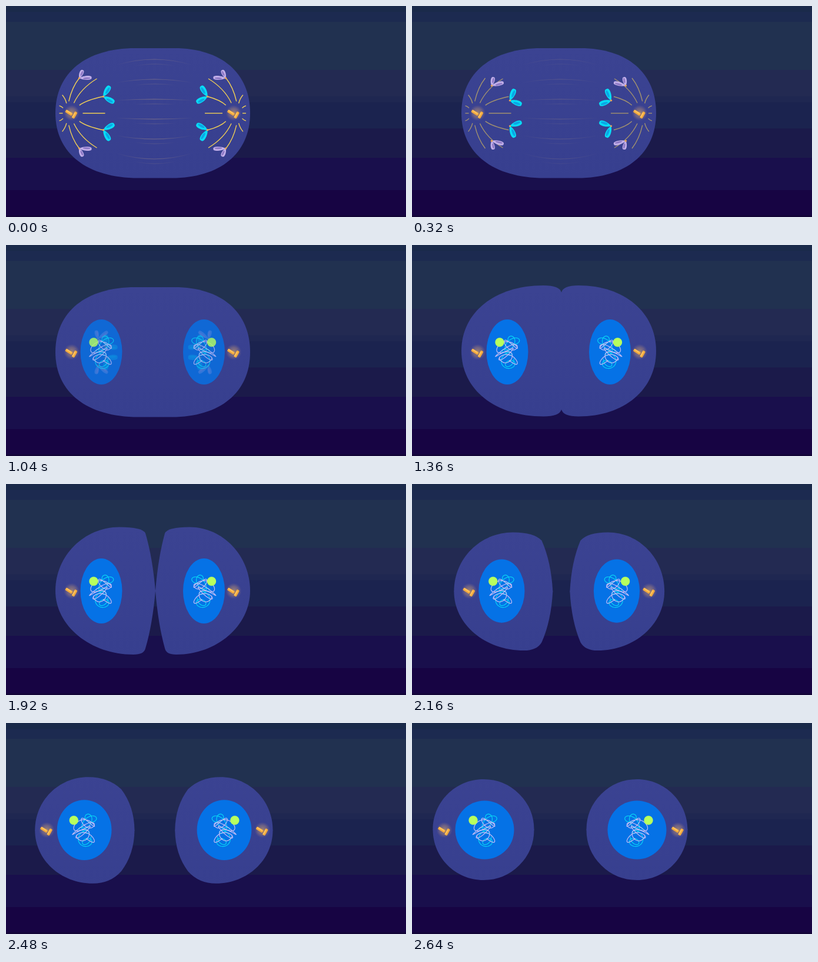
Write an HTML page with a canvas that moves like this. It is 680 by 360 pixels and loops after 2.88 s.

```html
<!DOCTYPE html>
<html lang="en">
<head>
<meta charset="utf-8">
<title>Cell division</title>
<style>
  html, body { margin: 0; width: 100%; height: 100%; overflow: hidden; background: #170443; }
  canvas { display: block; }
</style>
</head>
<body>
<canvas id="stage" width="680" height="360"></canvas>
<script>
const ctx = document.getElementById('stage').getContext('2d');
const LOOP = 2880, TICK = 80, MID_Y = 183;

const mix = (a, b, p) => Array.isArray(a) ? a.map((v, i) => mix(v, b[i], p)) : a + (b - a) * p;
const ramp = (t, from, to) => Math.min(1, Math.max(0, (t - from) / (to - from)));

function disc(x, y, rx, ry, fill) {
  ctx.fillStyle = fill;
  ctx.beginPath();
  ctx.ellipse(x, y, rx, ry, 0, 0, 7);
  ctx.fill();
}

function strokeCurve(...[x0, y0, cx, cy, x1, y1]) {
  ctx.beginPath();
  ctx.moveTo(x0, y0);
  ctx.quadraticCurveTo(cx, cy, x1, y1);
  ctx.stroke();
}

// dir points from the outer edge of each half towards the middle
const sides = [
  { dir: 1, pole: [111.5, 55], nucleus: [162, 123.5] },
  { dir: -1, pole: [387, 452], nucleus: [336.5, 382.5] }
];

// ---- background ----
const bands = [[0, '#1a2a4a'], [10, '#1c2a50'], [27, '#213150'], [109, '#232a52'], [154, '#1f2751'],
  [164, '#1b234f'], [209, '#1b1a4a'], [259, '#190f4c'], [314, '#170443'], [357, '#130538']];

function drawBackground() {
  for (const [y, color] of bands) {
    ctx.fillStyle = color;
    ctx.fillRect(0, y, 680, 360 - y);
  }
}

// ---- cell ----
// inner, outer: x for each side; apex (top, bottom) and shoulder[0]: share of the width
// from the inner edge; shoulder[1]: distance from the top or bottom edge
const poses = [
  { at: 1120, inner: [254, 254], outer: [84, 415], span: [72, 293.5],
    apex: [.2, .17], shoulder: [0, 0], round: .1, bulge: .62 },
  { at: 1360, inner: [254, 254], outer: [84, 415], span: [69, 292.5],
    apex: [.18, .18], shoulder: [0, 12], round: .1, bulge: .59 },
  { at: 1920, inner: [254, 254], outer: [84, 415], span: [73.5, 291],
    apex: [.36, .22], shoulder: [.1, 10.5], round: .12, bulge: .55 },
  { at: 2320, inner: [229.5, 278], outer: [63, 438.5], span: [88.5, 279.5],
    apex: [.43, .34], shoulder: [.12, 16.5], round: .36, bulge: .56 },
  { at: 2640, inner: [207.5, 296.5], outer: [35.5, 468.5], span: [96, 268],
    apex: [.5, .5], shoulder: [.1464, 25.2], round: .414, bulge: .5523 }
];

function poseAt(t) {
  const next = Math.max(1, poses.findIndex(p => p.at >= t));
  const a = poses[next - 1], b = poses[next], p = ramp(t, a.at, b.at);
  return Object.fromEntries(Object.keys(a).map(key => [key, mix(a[key], b[key], p)]));
}

// Upper or lower part of one half, from the inner edge round to the outer edge
function quarter(pose, side, end) {
  const { shoulder: [su, sv], round, bulge } = pose;
  const inner = pose.inner[side], outer = pose.outer[side];
  const edge = pose.span[end], mid = (pose.span[0] + pose.span[1]) / 2;
  const sign = end ? -1 : 1, half = Math.abs(mid - edge);
  const x = u => mix(inner, outer, u), apex = pose.apex[end];
  const path = new Path2D();
  path.moveTo(inner, mid);
  path.quadraticCurveTo(x(su * (.414 - round)), edge + sign * mix(sv, half, .414), x(su), edge + sign * sv);
  path.quadraticCurveTo(x(mix(su, apex, round)), edge, x(apex), edge);
  path.bezierCurveTo(x(mix(apex, 1, bulge)), edge, outer, mix(mid, edge, bulge), outer, mid);
  // A thin overlap hides the joint between the two parts
  path.lineTo(outer, mid + sign * .5);
  path.lineTo(inner, mid + sign * .5);
  return path;
}

function drawCell(t) {
  const pose = poseAt(t);
  const shade = ctx.createLinearGradient(0, 70, 0, 294);
  shade.addColorStop(0, '#3b4392');
  shade.addColorStop(1, '#373f8f');
  ctx.fillStyle = shade;
  const cell = new Path2D();
  for (const side of [0, 1]) {
    for (const end of [0, 1]) ctx.fill(quarter(pose, side, end));
  }
}

// ---- spindle ----
function drawArc(x0, x1, y, sag, alpha) {
  const fade = ctx.createLinearGradient(x0, 0, x1, 0);
  [0, alpha, 0].forEach((a, i) => fade.addColorStop(i / 2, `rgba(170,145,130,${a})`));
  ctx.strokeStyle = fade;
  strokeCurve(x0, y - sag, (x0 + x1) / 2, y + sag, x1, y - sag);
}

function drawFibres(poleX, dir) {
  const fibre = (angle, radius, endX, endY) => {
    const x = Math.cos(angle) * radius, y = Math.sin(angle) * radius;
    strokeCurve(x, y, mix(x, endX, .3), mix(y, endY, .6), endX, endY);
  };
  ctx.save();
  ctx.translate(poleX, MID_Y);
  ctx.scale(dir, 1);
  for (const up of [-1, 1]) {
    fibre(up * 1.8, 21, 13, up * 60);
    fibre(up * 1.35, 18, 43, up * 59);
    fibre(up * .8, 19, dir > 0 ? 53 : 44, up * 28.5);
  }
  fibre(0, 19, dir > 0 ? 57 : 49, 0);
  for (let k = -2; k <= 2; k++) {
    const a = Math.PI + k * .55, reach = 21 + k * k * 3.5;
    fibre(a, 15 + Math.abs(k) * 2, Math.cos(a) * reach, Math.sin(a) * reach);
  }
  ctx.restore();
}

function drawSpindle(alpha) {
  ctx.globalAlpha = alpha;
  ctx.lineWidth = 1.2;
  for (let row = -2.5; row <= 2.5; row++) {
    const y = 176 + row * 34, strength = .64 - Math.abs(row) * .1;
    drawArc(187, 317, y, row * 4, strength);
    drawArc(218, 288, y + 8, row * 1.5, strength * .5);
  }
  ctx.strokeStyle = '#f1cf55';
  ctx.lineWidth = 1.4;
  for (const { pole, dir } of sides) drawFibres(pole[0], dir);
  ctx.globalAlpha = 1;
}

// ---- chromosomes ----
// Poses: centre x, distance to the sides, distance up and down, angle
const chromosomes = [
  { fill: '#8d79c6', light: '#c3b0ea', width: 4.2, lengths: [15, 21], spread: .56,
    from: [249, 124.5, 60, -.6], to: [250, 100, 30, -1.1] },
  { fill: '#0ba6e6', light: '#08dcf6', width: 5.4, lengths: [21, 21], spread: .76,
    from: [254, 88.5, 28.5, -.27], to: [250.5, 82.5, 13, -.64] }
];

function drawLobe(length, angle, { fill, light, width }) {
  ctx.save();
  ctx.rotate(angle);
  ctx.beginPath();
  ctx.moveTo(0, 0);
  ctx.bezierCurveTo(length * .3, -width, length * 1.08, -width * 1.2, length, 0);
  ctx.bezierCurveTo(length * 1.08, width * 1.2, length * .3, width, 0, 0);
  ctx.fillStyle = light;
  ctx.fill();
  disc(length * .6, width * .2, length * .3, width * .38, fill);
  ctx.restore();
}

function drawChromosomes(t) {
  const travel = ramp(t, 80, 640) + .25 * ramp(t, 640, 1040);
  ctx.globalAlpha = 1 - ramp(t, 460, 1180);
  for (const look of chromosomes) {
    const [cx, dx, dy, angle] = mix(look.from, look.to, travel);
    for (const { dir } of sides) {
      for (const down of [1, -1]) {
        ctx.save();
        ctx.translate(cx - dir * dx, MID_Y - down * dy);
        ctx.scale(dir, down);
        look.lengths.forEach((length, i) => drawLobe(length, angle + (i ? 1 : -1) * look.spread, look));
        disc(0, 0, 1.7, 1.7, '#e9a45c');
        ctx.restore();
      }
    }
  }
  ctx.globalAlpha = 1;
}

// ---- nuclei ----
function drawThread(color, point) {
  ctx.beginPath();
  for (let s = 0; s <= 6; s += .03) {
    const [x, y] = point(s);
    ctx.lineTo(x - y * .15, y);
  }
  ctx.strokeStyle = color;
  ctx.lineWidth = 1.2;
  ctx.stroke();
}

function drawContents(x, dir, apart) {
  const { sin, cos } = Math;
  ctx.save();
  ctx.translate(x, MID_Y);
  ctx.scale(dir, 1);
  drawThread('#08d4f4', s => [4 + 9 * cos(5 * s) + 5 * sin(2 * s), 22 * sin(s + .5) + 8 * sin(5 * s)]);
  drawThread('#c4bcf6', s => [14 * sin(5 * s) + 6 * sin(2 * s + 1), 14 * cos(s) + 7 * sin(7 * s)]);
  disc(-mix(13, 19.5, apart), -17, 7.7, 7.7, '#b7ff5e');
  ctx.restore();
}

function drawNuclei(t, apart) {
  const alpha = ramp(t, 640, 1140);
  const centre = side => mix(...side.nucleus, apart);
  ctx.globalAlpha = alpha;
  for (const side of sides) {
    disc(centre(side), 182.5, mix(35.5, 50, apart), mix(55.5, 50, apart), '#0572e6');
  }
  drawChromosomes(t);
  ctx.globalAlpha = alpha;
  for (const side of sides) drawContents(centre(side), side.dir, apart);
  ctx.globalAlpha = 1;
}

// ---- centrioles ----
function drawBar(x, y, angle, length) {
  ctx.save();
  ctx.translate(x, y);
  ctx.rotate(angle);
  ctx.fillStyle = '#f5ab3e';
  ctx.beginPath();
  ctx.roundRect(-length / 2, -2.5, length, 5, 1.5);
  ctx.fill();
  ctx.fillStyle = '#ffcb6b';
  ctx.fillRect(-length / 2 + 1, -1.6, length - 3, 1.4);
  ctx.restore();
}

function drawCentriole(x) {
  const y = 182.5, radius = 13.5;
  const glow = ctx.createRadialGradient(x, y, 0, x, y, radius);
  glow.addColorStop(0, 'rgba(215,170,105,.65)');
  glow.addColorStop(.6, 'rgba(180,140,115,.4)');
  glow.addColorStop(1, 'rgba(150,120,130,0)');
  disc(x, y, radius, radius, glow);
  drawBar(x - 4.5, y - .5, .55, 13);
  drawBar(x + 5, y + 3.5, -1.05, 12);
}

function render(t) {
  const apart = ramp(t, 2000, 2640);
  drawBackground();
  drawCell(t);
  drawSpindle(1 - ramp(t, 80, 640));
  drawNuclei(t, apart);
  for (const { pole } of sides) drawCentriole(mix(...pole, apart));
}

const start = performance.now();
function loop() {
  const t = (performance.now() - start) % LOOP;
  render(Math.floor(t / TICK) * TICK);
  requestAnimationFrame(loop);
}
loop();
</script>
</body>
</html>
```
